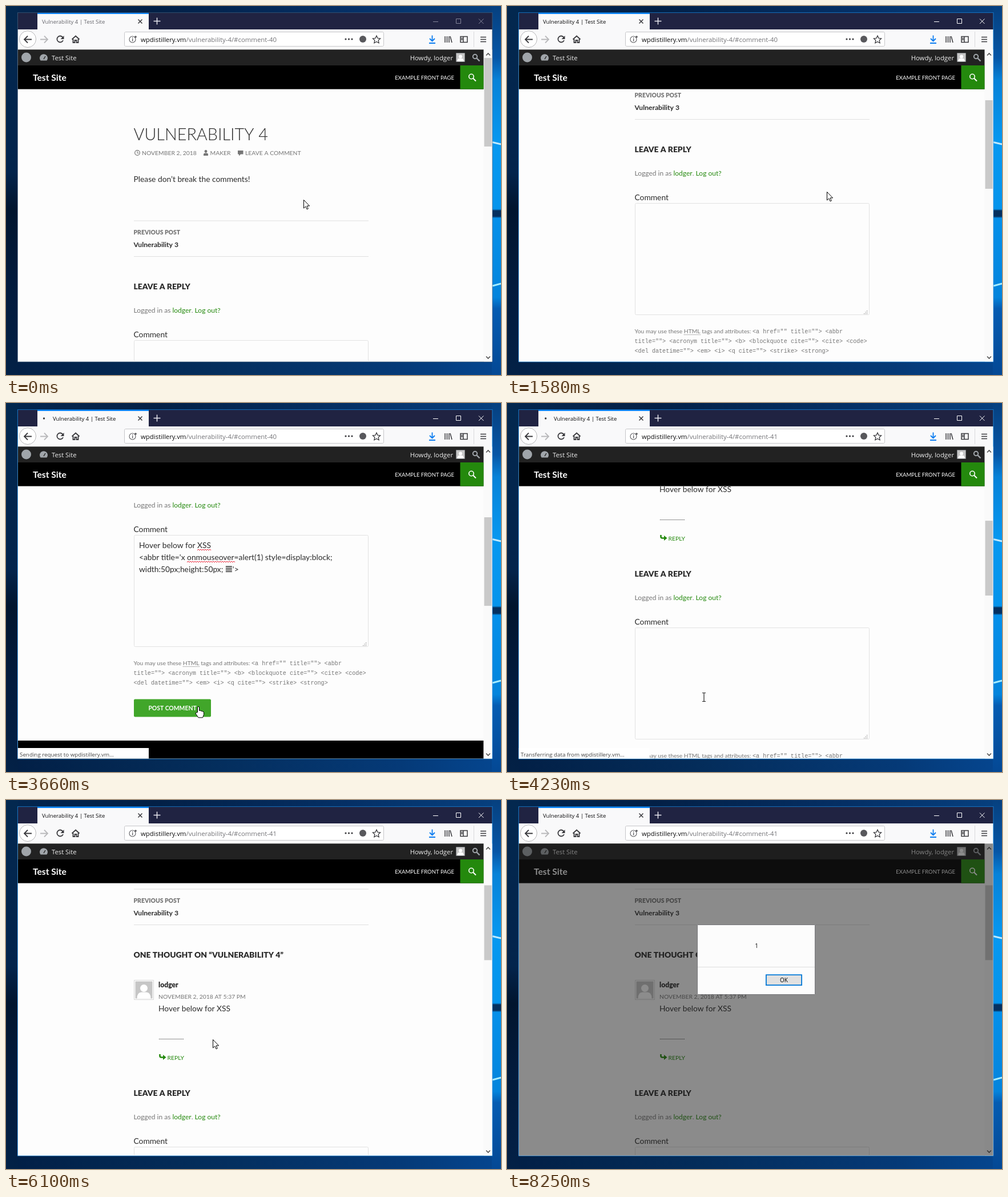
An HTML page with a canvas for the animation above (8350 ms loop, 867 by 646 pixels).

```html
<!DOCTYPE html>
<html lang="en">
<head>
<meta charset="utf-8">
<title>Comment form demo</title>
<style>
  html, body { margin: 0; width: 100%; height: 100%; overflow: hidden; }
  canvas { display: block; }
</style>
</head>
<body>
<canvas id="stage" width="867" height="646"></canvas>
<script>
const ctx = document.getElementById('stage').getContext('2d');
const LOOP = 8350;
const USER = 'lodger', AUTHOR = 'MAKER', HOST = 'wpdistillery.vm';
const GREEN = '#24890d', GREY = '#767676', INK = '#2b2b2b', ICON = '#3a3a3e';

// The desktop is seen at 86.7 %, so window edges fall between pixels.
const LEFT = 20.8, TOP = 76.3, BAR = 836.7, RIGHT = 851.4, BOTTOM = 622.5;

const TICKS = [0, 150, 270, 390, 540, 690, 830, 950, 1070, 1190, 1320, 1460, 1590, 1710, 1830,
  1970, 2090, 2380, 2520, 2640, 2770, 2890, 3010, 3150, 3280, 3400, 3520, 3660, 3820, 3960, 4080,
  4230, 4350, 4480, 4600, 4740, 4860, 4990, 5130, 6100, 6240, 6360, 7150, 7290, 7420, 7540, 7680, 8250];

const SCROLL = [[0, 0], [1070, 0], [1190, 10.4], [1320, 104], [1460, 240], [1590, 354],
  [4229, 354], [4230, 434], [4740, 434], [4860, 366], [4990, 270], [5130, 220]];

const POINTER = [[0, 521, 339, 'arrow'], [390, 453, 303, 'arrow'], [540, 399, 302, 'beam'],
  [690, 226, 316, 'beam'], [830, 300, 318, 'arrow'], [1190, 589, 305, 'arrow'], [1460, 560, 325, 'arrow'],
  [1590, 510, 330, 'beam'], [1970, 396, 328, 'beam'], [2520, 397, 335, 'beam'], [2890, 430, 440, 'arrow'],
  [3010, 449, 477, 'arrow'], [3280, 390, 515, 'arrow'], [3400, 346, 530, 'hand'], [3520, 337, 531, 'hand'],
  [4080, 337, 531, 'hand'], [4230, 345, 515, 'beam'], [4600, 398, 428, 'beam'], [4860, 398, 428, 'arrow'],
  [5130, 398, 428, 'arrow'], [6100, 362, 419, 'arrow'], [6240, 312, 405, 'arrow'], [6360, 287, 399, 'arrow'],
  [7149, 287, 399, 'arrow'], [7150, 333, 413, 'arrow'], [7540, 830, 627, 'resize'], [7680, 0, 0, 'none']];

function sample(keys, t) {
  const i = keys.findLastIndex(k => k[0] <= t);
  const a = keys[i], b = keys[i + 1] || a;
  const p = b === a ? 0 : (t - a[0]) / (b[0] - a[0]);
  return a.map((v, n) => typeof v === 'number' ? v + (b[n] - v) * p : v);
}

const lato = (size, weight = 400) => `${weight} ${size * 0.867}px Lato, sans-serif`;
const ui = size => `${size}px "Open Sans", sans-serif`;
const MONO = '10.15px "Liberation Mono", monospace';
const BODY = lato(15.92), SMALL = lato(13.88), TINY = lato(12);

function box(x, y, w, h, color) {
  ctx.fillStyle = color;
  ctx.fillRect(x, y, w, h);
}
function area(left, top, right, bottom, color) {
  box(left, top, right - left, bottom - top, color);
}
function frame(x, y, w, h, color, radius = 0) {
  ctx.beginPath();
  ctx.roundRect(x + 0.5, y + 0.5, w - 1, h - 1, radius);
  ctx.strokeStyle = color;
  ctx.lineWidth = 1;
  ctx.stroke();
}
function fill(d, color) {
  ctx.fillStyle = color;
  ctx.fill(new Path2D(d));
}
function stroke(d, color, width = 1.5) {
  ctx.strokeStyle = color;
  ctx.lineWidth = width;
  ctx.stroke(new Path2D(d));
}
function disc(x, y, r, color) {
  ctx.beginPath();
  ctx.arc(x, y, r, 0, 7);
  ctx.fillStyle = color;
  ctx.fill();
}
function ring(x, y, r, color, width) {
  ctx.beginPath();
  ctx.arc(x, y, r, 0, 7);
  ctx.strokeStyle = color;
  ctx.lineWidth = width;
  ctx.stroke();
}
// Returns the x at which the text ends.
function write(str, x, y, font, color, align = 'left') {
  ctx.font = font;
  ctx.fillStyle = color;
  ctx.textAlign = align;
  ctx.fillText(str, x, y);
  return x + ctx.measureText(str).width;
}
function gradient(x, y, w, h, vertical, stops) {
  const g = ctx.createLinearGradient(0, 0, vertical ? 0 : 867, vertical ? 646 : 0);
  stops.forEach(([p, c]) => g.addColorStop(p, c));
  box(x, y, w, h, g);
}

function drawDesktop() {
  gradient(0, 0, 867, 12, false, [[0, '#03264f'], [0.3, '#032046'], [0.7, '#053066'], [1, '#07407f']]);
  gradient(0, 622, 867, 24, false, [[0, '#021f45'], [0.4, '#042d5b'], [0.8, '#053a78'], [1, '#054690']]);
  gradient(0, 0, 21, 646, true, [[0, '#03284f'], [0.45, '#03244c'], [0.55, '#01152e'], [0.75, '#021b3d'], [1, '#032146']]);
  gradient(851, 0, 16, 646, true, [[0, '#06407f'], [0.14, '#0656a6'], [0.2, '#0782d8'], [0.37, '#0798f0'], [0.55, '#0594ec'],
    [0.555, '#05305f'], [0.57, '#05305f'], [0.575, '#0590ea'], [0.79, '#0484dc'], [0.82, '#055cb2'], [1, '#044894']]);
  stroke('M852 238.5L867 242', '#bfeaff', 3);
  stroke('M852 490L867 486', '#a6ecff', 3);
}

function drawWindow(t) {
  const active = t >= 540, loading = t >= 3660 && t < 4600;
  const button = active ? '#fff' : '#85869b';
  area(19.9, 11.3, 852.3, 623.4, active ? '#1a84d8' : '#3d5a78');
  area(LEFT, 12.1, RIGHT, 41, '#202342');
  box(55, 12, 195, 29, '#f9f9fa');
  box(55, 12, 195, 2, '#0a84ff');
  write('Vulnerability 4 | Test Site', loading ? 82 : 63, 31, ui(9.55), active ? '#0c0c0d' : '#66666c');
  if (loading) disc(66.5 + 4 * Math.sin((t - 3660) / 200), 27, 1.7, ICON);
  stroke('M231.5 23.5l7 7m0-7l-7 7', ICON);
  stroke('M258.500 26.500h12m-6-6v12', '#e8e8f0');
  stroke('M748 27.500h9', button, 1);
  frame(788, 22, 9, 9, button);
  stroke('M828 22.500l8.500 8.500m0-8.500l-8.500 8.500', button, 1);

  area(LEFT, 41, RIGHT, BOTTOM, '#f9f9fa');
  disc(38, 58, 14.5, '#fff');
  ring(38, 58, 14.5, '#b6b6b8', 1);
  stroke('M45 58.500h-13m6-6l-6 6l6 6', ICON, 1.8);
  stroke('M60 58.500h13m-6-6l6 6l-6 6', '#b9b9bb', 1.8);
  stroke('M99.500 55a5.500 5.500 0 1 0 0.500 5', ICON, 1.8);
  fill('M101.500 52v6h-6z', ICON);
  stroke('M115.500 58.500l6.500-6l6.500 6M117.500 58v6h3v-4h3v4h3v-6', ICON, 1.8);
  box(207, 45, 455, 26, '#fff');
  frame(207, 45, 455, 26, '#c6c6c9', 2);
  ring(221.5, 58.5, 5.5, '#58585c', 1.1);
  box(221, 57.5, 1.4, 4, '#58585c');
  box(221, 55, 1.4, 1.4, '#58585c');
  disc(227, 54, 1.8, '#58585c');
  const path = write(HOST, 236, 63, ui(11.4), '#0c0c0d');
  write('/vulnerability-4/#comment-' + (t < 3960 ? 40 : 41), path, 63, ui(11.4), '#747478');
  for (let x = 595; x < 610; x += 5.5) disc(x, 58, 1.6, ICON);
  disc(625, 58, 6, '#58585c');
  stroke('M649 52l2 4.300l4.600 .6l-3.400 3.200l.9 4.600l-4.100-2.300l-4.100 2.300l.9-4.600l-3.400-3.200l4.600-.6z', ICON, 1.3);
  stroke('M746.500 51.500v10m-4.500-4.500l4.500 4.500l4.500-4.500M741 65h11', '#0a7cf0', 1.8);
  stroke('M769 53v11m3.500-11v11m3.500-11v11m2-11l3 11', ICON);
  stroke('M796 53.500h12v10h-12zM801 53.500v10M797 56.500h3m-3 2.500h3', ICON);
  box(819, 45, 1, 27, '#d9d9dc');
  stroke('M831 54.500h10m-10 4h10m-10 4h10', ICON);
}

function person(x, y, size) {
  box(x, y, size, size, '#c6c6c6');
  const u = size / 30;
  disc(x + 15 * u, y + 12 * u, 6.5 * u, '#fff');
  fill(`M${x + 3 * u} ${y + size}q0 ${-11 * u} ${8 * u} ${-11 * u}h${8 * u}q${8 * u} 0 ${8 * u} ${11 * u}z`, '#fff');
}

function squiggle(x, end, y) {
  let d = `M${x} ${y}`;
  for (let up = true; x < end; x += 2, up = !up) d += `l2 ${up ? -2 : 2}`;
  stroke(d, '#e8192c', 1);
}

function drawTyped(t) {
  const caret = t < 2890 || t >= 3400;
  let x = 233, y = 603;
  if (t >= 2380) {
    const start = write('Hover below for ', 233, 608, BODY, INK);
    squiggle(start, write('XSS', start, 608, BODY, INK), 612);
    const attr = write("<abbr title='x ", 233, 628.8, BODY, INK);
    const attrEnd = write('onmouseover', attr, 628.8, BODY, INK);
    squiggle(attr, attrEnd, 633);
    write('=alert(1) style=display:block;', attrEnd, 628.8, BODY, INK);
    x = write('width:50px;height:50px; ', 233, 649.6, BODY, INK);
    for (let i = 0; i < 4; i++) box(x + 1, 639.5 + i * 3, 11, 1.5, INK);
    x = write("'>", x + 13, 649.6, BODY, INK);
    y = 644.5;
  }
  if (caret && t < 3520) box(x, y - 8, 1, 17, '#000');
}

function drawForm(t) {
  const focused = t >= 1970 && t < 3520;
  write('LEAVE A REPLY', 223.5, 496, lato(16, 900), INK);
  let x = write('Logged in as ', 223.5, 537, SMALL, GREY);
  x = write(USER, x, 537, SMALL, GREEN);
  x = write('. ', x, 537, SMALL, GREY);
  write('Log out?', x, 537, SMALL, GREEN);
  write('Comment', 223.5, 579.5, BODY, INK);
  frame(224, 585, 411, 196, focused ? '#a4a4a4' : '#e2e2e2', 2);
  for (let i = 0; i < 3; i++)
    for (let j = 0; j <= i; j++) box(630 - j * 2.5, 773 + i * 2.5, 1.2, 1.2, '#909090');
  if (t >= 1970 && t < 4230) drawTyped(t);

  const hint = lato(11.85);
  x = write('You may use these ', 223.5, 813, hint, GREY);
  const end = write('HTML', x, 813, hint, GREY);
  for (let i = x; i < end; i += 2) box(i, 815, 1, 1, GREY);
  write(' tags and attributes:', end, 813, hint, GREY);
  write('<a href="" title=""> <abbr', 430, 813, MONO, GREY);
  write('title=""> <acronym title=""> <b> <blockquote cite=""> <cite> <code>', 223.5, 830, MONO, GREY);
  write('<del datetime=""> <em> <i> <q cite=""> <strike> <strong>', 223.5, 847, MONO, GREY);

  const color = t < 3400 || t >= 4230 ? GREEN : t >= 3520 && t < 3660 ? '#55d737' : '#41a62a';
  ctx.beginPath();
  ctx.roundRect(224, 872.5, 135, 31, 2);
  ctx.fillStyle = color;
  ctx.fill();
  write('POST COMMENT', 291.5, 892, lato(12, 700), '#fff', 'center');
  box(LEFT, 945, BAR - LEFT, 400, '#000');
}

function drawThread() {
  write('ONE THOUGHT ON “VULNERABILITY 4”', 223.5, 496, lato(16, 900), INK);
  frame(224, 535, 35, 35, '#d8d8d8');
  person(226.5, 537.5, 30);
  write(USER, 267, 548, lato(14, 900), INK);
  write('NOVEMBER 2, 2018 AT 5:37 PM', 267, 568, TINY, GREY);
  write('Hover below for XSS', 267, 590, BODY, INK);
  for (let x = 268; x < 311; x += 2) box(x, 638, 1, 1, INK);
  stroke('M269.500 665v3q0 2.500 2.500 2.500h4', GREEN, 2.6);
  fill('M275 666l5.500 4.500l-5.500 4.500z', GREEN);
  write('REPLY', 282.5, 674.5, TINY, GREEN);
}

function drawPage(t, scroll) {
  const posted = t >= 4230;
  ctx.save();
  ctx.beginPath();
  ctx.rect(LEFT, TOP, BAR - LEFT, BOTTOM - TOP);
  ctx.clip();
  area(LEFT, TOP, BAR, BOTTOM, '#fdfdfd');
  ctx.translate(0, -scroll);
  write('VULNERABILITY 4', 223.5, 235, lato(33.25, 300), INK);
  ring(230, 257, 4.3, GREY, 1.2);
  stroke('M230 254v3.500h2.500', GREY, 1);
  write('NOVEMBER 2, 2018', 238, 261, TINY, GREY);
  disc(350, 254.5, 2.4, GREY);
  fill('M346 262v-2q0-2.500 2.500-2.500h3q2.500 0 2.500 2.500v2z', GREY);
  write(AUTHOR, 357.5, 261, TINY, GREY);
  fill('M406 253h9.500v6.500h-4.500l-3 3v-3h-2z', GREY);
  write('LEAVE A COMMENT', 419, 261, TINY, GREY);
  write('Please don’t break the comments!', 223.5, 308, BODY, INK);
  box(224, 375.5, 411, 1, '#e0e0e0');
  write('PREVIOUS POST', 223.5, 400, lato(12, 900), GREY);
  write('Vulnerability 3', 223.5, 421.5, lato(14, 700), INK);
  box(224, 438, 411, 1, '#e0e0e0');
  if (posted) {
    drawThread();
    ctx.translate(0, 242);
  }
  drawForm(t);
  ctx.restore();

  area(LEFT, TOP, BAR, 104, '#222');
  disc(35.5, 90, 8.5, '#a0a5aa');
  fill('M60.500 95.500a7 7 0 1 1 11 0z', '#a0a5aa');
  stroke('M66 93l3-5', '#222', 1.4);
  write('Test Site', 80, 94.5, ui(11.3), '#eee');
  write('Howdy, ' + USER, 783, 94.5, ui(11.3), '#eee', 'right');
  frame(788, 82, 16, 16, '#85888b');
  person(789, 83, 14);
  ring(821.5, 88.5, 3.7, '#a0a5aa', 2);
  stroke('M824.500 91.500l5 5', '#a0a5aa', 2.4);
  area(LEFT, 104, BAR, 145.6, '#000');
  write('Test Site', 47, 130.5, lato(18, 700), '#fff');
  write('EXAMPLE FRONT PAGE', 785, 129, lato(11), '#fff', 'right');
  area(795.5, 104, BAR, 145.6, GREEN);
  ring(815, 123.5, 4.2, '#fff', 1.6);
  stroke('M818 126.500l5 5', '#fff', 2);

  area(BAR, TOP, RIGHT, BOTTOM, '#fafafa');
  box(837.6, 91 + scroll / (posted ? 3.77 : 3.245), 13, posted ? 131 : 155, '#c9c9c9');
  stroke('M841 86.500l3.500-3.500l3.500 3.500M841 613.500l3.500 3.500l3.500-3.500', '#505050', 1.6);
}

function drawStatus(t) {
  if (t < 3660 || t >= 4600) return;
  const action = t < 3820 ? 'Sending request to ' : t < 3960 ? 'Waiting for ' : 'Transferring data from ';
  area(LEFT, 604, 250, BOTTOM, '#fff');
  write(action + HOST + '…', 24, 618.5, ui(9.8), '#444');
}

function drawAlert() {
  area(LEFT, TOP, RIGHT, BOTTOM, 'rgba(26,26,26,.5)');
  box(333, 218, 207, 123, '#fcfcfc');
  frame(333, 218, 207, 123, '#77777a');
  box(334, 292, 205, 1, '#dedede');
  write('1', 437, 258.5, ui(10), '#000', 'center');
  box(453, 305.3, 64, 19.7, '#0078d7');
  box(454.8, 307, 60.4, 16.2, '#e1e1e1');
  write('OK', 485, 318.5, ui(10), '#000', 'center');
}

const SHAPES = {
  arrow: 'M.5 .5v14.500l3.300-3.100l2.300 5l2.200-1l-2.300-4.900h4.600z',
  hand: 'M-1.500 10.500v-8.500q0-1.500 1.500-1.500t1.500 1.500v5.500q3-.8 3 .8q3-.6 3 1q2-.3 2 1.500v3.500l-2 5.500h-7.500l-4.500-6.500q-1-2.300 1-2.300z',
  resize: 'M0-9.500l4 4.500h-3v10h3l-4 4.500l-4-4.500h3v-10h-3z'
};

function drawPointer(t) {
  const [, x, y, shape] = sample(POINTER, t);
  ctx.save();
  ctx.translate(Math.round(x), Math.round(y));
  if (shape === 'beam') {
    stroke('M-3-7.500h2.500l.5 .5l.5-.5h2.500M0-7v14M-3 7.500h2.500l.5-.5l.5 .5h2.500', '#222', 1.2);
  } else if (SHAPES[shape]) {
    fill(SHAPES[shape], '#fff');
    stroke(SHAPES[shape], '#000', 1);
  }
  ctx.restore();
}

function render() {
  const now = performance.now() % LOOP;
  const t = TICKS.findLast(tick => tick <= now);
  drawDesktop();
  drawWindow(t);
  drawPage(t, sample(SCROLL, t)[1]);
  drawStatus(t);
  if (t >= 6360) drawAlert();
  drawPointer(t);
  requestAnimationFrame(render);
}
render();
</script>
</body>
</html>
```
